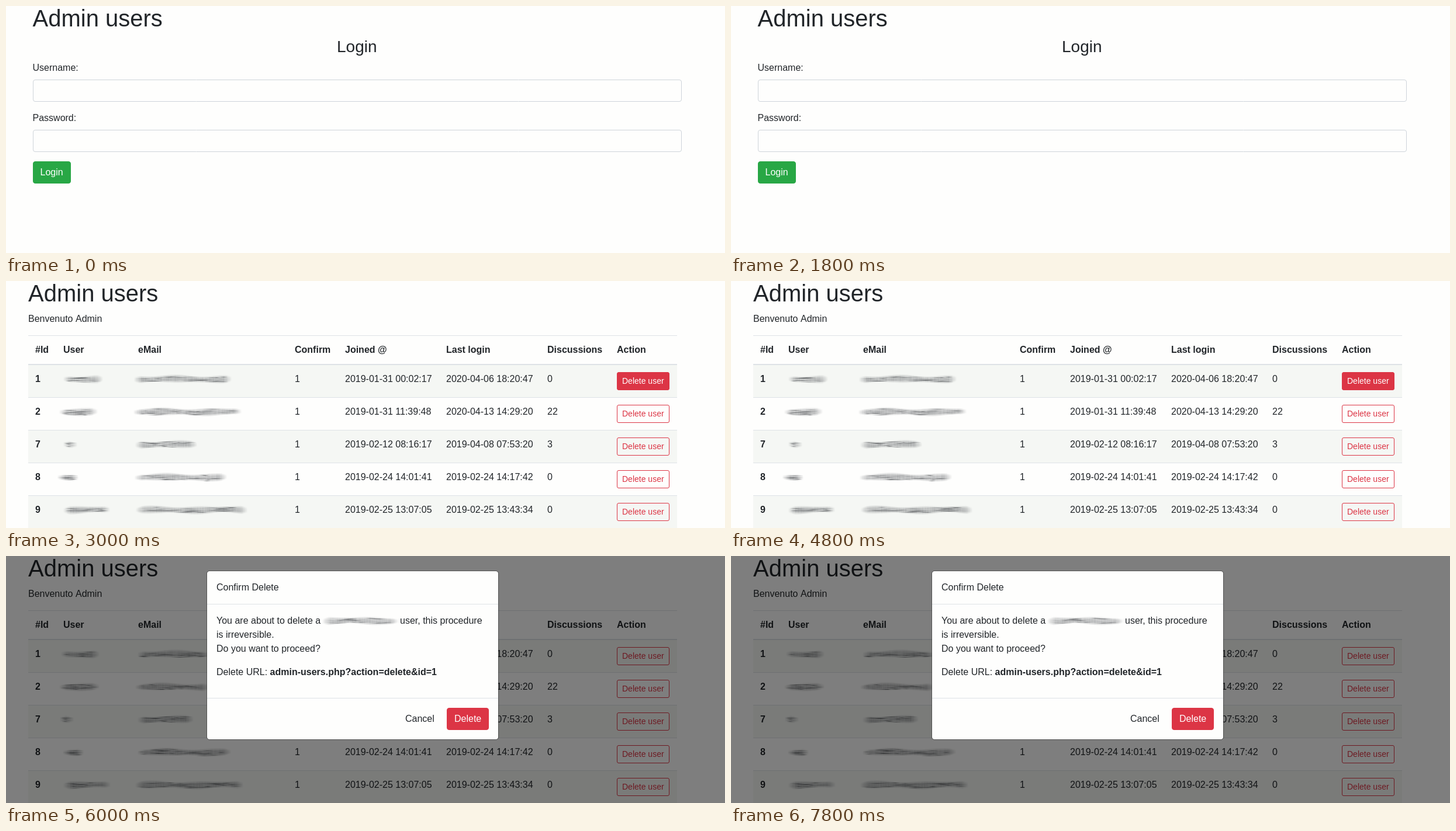
Write an HTML page with a canvas that moves like this. It is 1230 px wide and 423 px high and loops after 9000 ms.

```html
<!DOCTYPE html>
<html lang="en">
<head>
<meta charset="utf-8">
<title>Admin users</title>
<style>
  html, body { margin: 0; width: 100%; height: 100%; overflow: hidden; background: #fefefd; }
  canvas { display: block; }
</style>
</head>
<body>
<canvas id="stage" width="1230" height="423"></canvas>
<script>
const ctx = document.getElementById('stage').getContext('2d');
const W = 1230, H = 423, SCENE_MS = 3000;
const PAPER = '#fefefd', INK = '#212529', LINE = '#dee2e6', RED = '#dc3545', GREEN = '#28a745';

const users = [
  { id: 1, joined: '2019-01-31 00:02:17', last: '2020-04-06 18:20:47', posts: 0 },
  { id: 2, joined: '2019-01-31 11:39:48', last: '2020-04-13 14:29:20', posts: 22 },
  { id: 7, joined: '2019-02-12 08:16:17', last: '2019-04-08 07:53:20', posts: 3 },
  { id: 8, joined: '2019-02-24 14:01:41', last: '2019-02-24 14:17:42', posts: 0 },
  { id: 9, joined: '2019-02-25 13:07:05', last: '2019-02-25 13:43:34', posts: 0 }
];
// Blurred cells per row: user start, user end, mail start, mail end
const listBlurs = [
  [98, 166, 219, 386], [91, 157, 218, 403], [98, 122, 221, 327],
  [88, 124, 220, 378], [98, 178, 222, 413]
];
const dialogBlurs = [
  [94, 160, 225, 348], [91, 160, 221, 348], [92, 116, 225, 321],
  [97, 133, 225, 385], [98, 179, 221, 406]
];

function text(str, x, y, size = 16, color = INK, bold = false) {
  ctx.font = `${bold ? 'bold ' : ''}${size}px "Liberation Sans", Arial, sans-serif`;
  ctx.fillStyle = color;
  ctx.fillText(str, x, y);
}

function rect(x, y, w, h, color) {
  ctx.fillStyle = color;
  ctx.fillRect(x, y, w, h);
}

function box(x, y, w, h, r, fill, stroke) {
  ctx.beginPath();
  ctx.roundRect(x + 0.5, y + 0.5, w - 1, h - 1, r - 0.5);
  if (fill) {
    ctx.fillStyle = fill;
    ctx.fill();
  }
  ctx.strokeStyle = stroke || fill;
  ctx.lineWidth = 1;
  ctx.stroke();
}

function random(seed) {
  let s = seed * 7919 + 17;
  return () => (s = (s * 16807) % 2147483647) / 2147483647;
}

// Text rubbed out sideways: soft grey body, long streaks and a fine grain
function smudge(x0, x1, y, seed) {
  const rnd = random(seed), w = x1 - x0;
  const mid = x => y + Math.sin(x / 19 + seed) * 0.8;
  const half = x => {
    const ends = Math.min(1, (x - x0 + 2) / 12, (x1 - x + 2) / 12);
    return (4.6 + Math.sin(x / 13 + seed * 2) * 1.1) * (0.45 + 0.55 * ends);
  };
  for (let x = x0; x < x1; x++) {
    const fade = Math.min(1, (x - x0 + 1) / 14, (x1 - x) / 14);
    const m = mid(x), h = half(x), a = (0.32 + rnd() * 0.08) * fade;
    const g = ctx.createLinearGradient(0, m - h - 2, 0, m + h + 2);
    g.addColorStop(0, 'rgba(80,83,87,0)');
    g.addColorStop(0.35, `rgba(80,83,87,${a})`);
    g.addColorStop(0.65, `rgba(80,83,87,${a * 1.15})`);
    g.addColorStop(1, 'rgba(80,83,87,0)');
    rect(x, m - h - 2, 1, 2 * h + 4, g);
    if (x % 2) rect(x, Math.round(m - h * 0.6), 1, Math.round(h), `rgba(255,255,255,${0.16 * fade})`);
  }
  for (let i = 0; i < w / 4; i++) {
    const len = Math.min(w, 10 + rnd() * 28), x = x0 + rnd() * (w - len);
    const m = mid(x + len / 2), h = half(x + len / 2);
    const yy = Math.round(m + (rnd() * 2 - 1) * h);
    const tone = rnd() < 0.7 ? '45,48,52' : '235,236,235';
    const g = ctx.createLinearGradient(x, 0, x + len, 0);
    g.addColorStop(0, `rgba(${tone},0)`);
    g.addColorStop(0.5, `rgba(${tone},${0.2 + rnd() * 0.3})`);
    g.addColorStop(1, `rgba(${tone},0)`);
    rect(x, yy, len, 1, g);
  }
}

function drawLogin() {
  rect(0, 0, W, H, PAPER);
  text('Admin users', 45.5, 35, 40);
  text('Login', 566, 79, 28);
  text('Username:', 45.5, 111);
  box(46, 126, 1110, 38, 4, null, '#ced4da');
  text('Password:', 45.5, 197);
  box(46, 212, 1110, 38, 4, null, '#ced4da');
  box(46, 266, 65, 38, 4, GREEN);
  text('Login', 58.5, 290, 16, '#fff');
}

function drawList(blurs, pressed) {
  rect(0, 0, W, H, PAPER);
  text('Admin users', 38, 35, 40);
  text('Benvenuto Admin', 38, 70);
  rect(38, 93, 1110, 1, LINE);
  const heads = { '#Id': 50, 'User': 98, 'eMail': 226, 'Confirm': 494, 'Joined @': 580,
    'Last login': 753, 'Discussions': 926, 'Action': 1045 };
  for (const name in heads) text(name, heads[name], 123, 16, INK, true);

  users.forEach((u, i) => {
    const top = 144 + i * 56, base = top + 29;
    if (i % 2 === 0) rect(38, top, 1110, 55, '#f5f7f4');
    if (i) rect(38, top - 1, 1110, 1, LINE);
    text(u.id, 50, base, 16, INK, true);
    const [a, b, c, d] = blurs[i];
    smudge(a, b, top + 24, u.id);
    smudge(c, d, top + 24, u.id + 20);
    text('1', 494, base);
    text(u.joined, 580, base);
    text(u.last, 753, base);
    text(u.posts, 926, base);
    const on = pressed && i === 0;
    box(1045, top + 12, 90, 31, 3, on ? RED : null, RED);
    text('Delete user', 1054, top + 32, 14, on ? '#fff' : RED);
  });
  rect(38, 142, 1110, 2, LINE);
}

function drawDialog() {
  drawList(dialogBlurs, false);
  rect(0, 0, W, H, 'rgba(0,0,0,0.5)');
  box(343, 25, 500, 290, 5, null, 'rgba(0,0,0,0.35)');
  box(344, 26, 498, 288, 4, PAPER);
  text('Confirm Delete', 360, 59);
  rect(344, 82, 498, 1, LINE);
  text('You are about to delete a', 360, 116);
  smudge(541, 671, 111, 5);
  text('user, this procedure', 674, 116);
  text('is irreversible.', 360, 140);
  text('Do you want to proceed?', 360, 164);
  text('Delete URL: ', 360, 204);
  text('admin-users.php?action=delete&id=1', 451.6, 204, 16, INK, true);
  rect(344, 243, 498, 1, LINE);
  text('Cancel', 683, 284);
  box(754, 260, 72, 38, 4, RED);
  text('Delete', 767, 284, 16, '#fff');
}

const scenes = [drawLogin, () => drawList(listBlurs, true), drawDialog];
const start = performance.now();
let shown = -1;

function tick() {
  const scene = Math.floor((performance.now() - start) / SCENE_MS) % scenes.length;
  if (scene !== shown) scenes[shown = scene]();
  requestAnimationFrame(tick);
}
tick();
</script>
</body>
</html>
```
